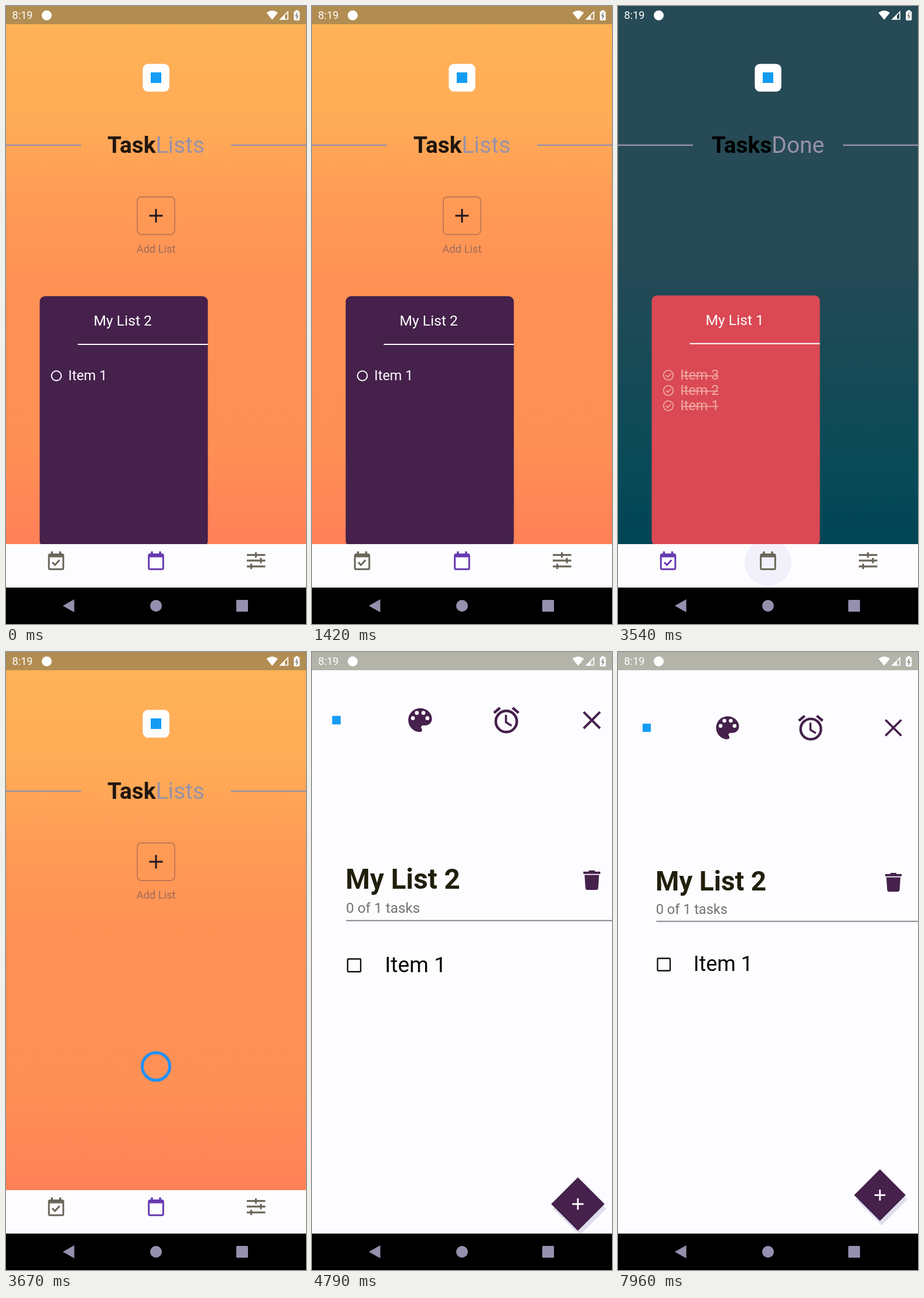
An HTML page with a canvas for the animation above (8 s loop, 512 by 1052 pixels).

```html
<!DOCTYPE html>
<html lang="en">
<head>
<meta charset="utf-8">
<title>Task lists</title>
<style>
html, body { margin: 0; width: 100%; height: 100%; overflow: hidden; background: #000; }
canvas { display: block; width: 100vw; height: 100vh; }
</style>
</head>
<body>
<canvas id="stage"></canvas>
<script>
const W = 512, H = 1052, LOOP = 8000;
const NAV_TOP = 916, PAGE_BOTTOM = 990;
const canvas = document.getElementById('stage');
const ctx = canvas.getContext('2d');
const ratio = window.devicePixelRatio || 1;
canvas.width = W * ratio;
canvas.height = H * ratio;

const PURPLE = '#45214c', RED = '#da4954', PAPER = '#fdfcff', MUTED = '#9792a9';
const ACTIVE = '#673ab0', IDLE = '#6a665a', KEYS = '#9590ae', BLUE = '#149cf5';

// Times of the two tab taps and of the tap that opens the list
const TAP_DONE = 1750, TAP_LISTS = 3420, OPEN = 4160;
const PAGE_DELAY = 150, TAB_DELAY = 200, LOAD_DELAY = 300;

const clamp = v => Math.max(0, Math.min(1, v));

function text(str, x, y, size, color, weight = 400, align = 'left') {
  ctx.font = `${weight} ${size}px Roboto, sans-serif`;
  ctx.textAlign = align;
  ctx.fillStyle = color;
  ctx.fillText(str, x, y);
}

function rect(x, y, w, h, color) {
  ctx.fillStyle = color;
  ctx.fillRect(x, y, w, h);
}

function round(x, y, w, h, r) {
  ctx.beginPath();
  ctx.roundRect(x, y, w, h, r);
}

function disc(x, y, r, color) {
  ctx.beginPath();
  ctx.arc(x, y, r, 0, Math.PI * 2);
  ctx.fillStyle = color;
  ctx.fill();
}

function ring(x, y, r, width, color) {
  ctx.beginPath();
  ctx.arc(x, y, r, 0, Math.PI * 2);
  ctx.lineWidth = width;
  ctx.strokeStyle = color;
  ctx.stroke();
}

function trace(points, close) {
  ctx.beginPath();
  points.forEach(([x, y]) => ctx.lineTo(x, y));
  if (close) ctx.closePath();
}

function line(points, width, color, close = false) {
  trace(points, close);
  ctx.lineWidth = width;
  ctx.strokeStyle = color;
  ctx.stroke();
}

function poly(points, color) {
  trace(points, true);
  ctx.fillStyle = color;
  ctx.fill();
}

function plus(x, y, r, width, color) {
  line([[x - r, y], [x + r, y]], width, color);
  line([[x, y - r], [x, y + r]], width, color);
}

function at(x, y, scale, draw) {
  ctx.save();
  ctx.translate(x, y);
  ctx.scale(scale, scale);
  draw();
  ctx.restore();
}

function background(stops) {
  const g = ctx.createLinearGradient(0, 0, 0, 1000);
  stops.forEach(([pos, color]) => g.addColorStop(pos, color));
  rect(0, 0, W, H, g);
}

function heading(bold, light, ink) {
  const size = 38.9;
  ctx.font = `700 ${size}px Roboto, sans-serif`;
  const a = ctx.measureText(bold).width;
  ctx.font = `400 ${size}px Roboto, sans-serif`;
  const x = 256 - (a + ctx.measureText(light).width) / 2;
  text(bold, x, 250, size, ink, 700);
  text(light, x + a, 250, size, MUTED);
  rect(0, 235.7, 128, 2.4, MUTED);
  rect(384, 235.7, 128, 2.4, MUTED);
}

function badge() {
  round(233.4, 98.4, 45.4, 47.4, 9);
  ctx.fillStyle = '#fefefe';
  ctx.fill();
  rect(247, 113, 18, 18, BLUE);
}

function card(top, color, title) {
  round(57.5, top, 287, 426, 9);
  ctx.fillStyle = color;
  ctx.fill();
  text(title, 149.5, top + 50, 24.7, '#fff');
  rect(122.5, top + 81, 222, 2, '#fff');
}

function doneItem(label, y) {
  const tint = '#efa9a5';
  ring(86, y, 8.3, 1.8, tint);
  line([[82, y], [85, y + 3], [90.5, y - 3]], 1.8, tint);
  text(label, 106.3, y + 7.8, 23.5, tint);
  rect(108, y + 0.3, 63, 1.7, tint);
}

const loader = () => ring(256, 705.5, 23.5, 5, '#2090fb');

function listsPage(loaded) {
  background([[0, '#ffb457'], [0.2, '#ffab57'], [0.33, '#ff9b56'], [0.48, '#ff9155'], [0.74, '#ff9055'], [0.92, '#ff8057']]);
  rect(0, 0, W, 31, '#b28d52');
  badge();
  heading('Task', 'Lists', '#21160f');
  round(224, 325, 64, 64, 7);
  ctx.lineWidth = 1.4;
  ctx.strokeStyle = '#b06d55';
  ctx.stroke();
  plus(256, 357, 11.5, 3, '#21151a');
  text('Add List', 256, 420, 18.3, '#a06a58', 400, 'center');
  if (!loaded) return loader();
  card(494, PURPLE, 'My List 2');
  ring(86, 629.5, 8.3, 2, '#fff');
  text('Item 1', 106.3, 637, 23.5, '#fff');
}

function donePage(loaded) {
  background([[0, '#264a56'], [0.43, '#264a56'], [0.8, '#074a57'], [0.92, '#004457']]);
  badge();
  heading('Tasks', 'Done', '#000');
  if (!loaded) return loader();
  card(492.7, RED, 'My List 1');
  [3, 2, 1].forEach((n, i) => doneItem('Item ' + n, 628.5 + i * 26));
}

function calendar(x, color, checked) {
  round(x - 12.3, 933.5, 24.6, 25.2, 2);
  ctx.lineWidth = 3;
  ctx.strokeStyle = color;
  ctx.stroke();
  rect(x - 12.5, 933, 25, 5.5, color);
  rect(x - 8.8, 928.5, 3.6, 6, color);
  rect(x + 5.2, 928.5, 3.6, 6, color);
  if (checked) line([[x - 6.5, 947], [x - 2, 951.5], [x + 6, 943]], 3, color);
}

function sliders() {
  [[934.5, 426.5], [944, 435], [954, 418.5]].forEach(([y, knob]) => {
    rect(411, y - 1.6, 31.5, 3.2, IDLE);
    rect(knob - 1.6, y - 4.5, 3.2, 9, IDLE);
  });
}

function ripple(x, age) {
  if (age < 0 || age > 200) return;
  ctx.globalAlpha = 1 - clamp((age - 120) / 80);
  disc(x, 947, 40 * Math.sqrt(clamp(age / 100)), '#f2f0fb');
  ctx.globalAlpha = 1;
}

function tabs(t, doneTab) {
  ctx.save();
  ctx.beginPath();
  ctx.rect(0, NAV_TOP, W, PAGE_BOTTOM - NAV_TOP);
  ctx.clip();
  rect(0, NAV_TOP, W, 74, '#fdfdff');
  ripple(85.5, t - TAP_DONE);
  ripple(256, t - TAP_LISTS);
  calendar(85.5, doneTab ? ACTIVE : IDLE, true);
  calendar(256, doneTab ? IDLE : ACTIVE, false);
  sliders();
  ctx.restore();
}

function palette() {
  ctx.fillStyle = PURPLE;
  ctx.fill(new Path2D('M0-9c-4.97 0-9 4.03-9 9s4.03 9 9 9c.83 0 1.5-.67 1.5-1.5 0-.39-.15-.74-.39-1.01-.23-.26-.38-.61-.38-.99 0-.83.67-1.5 1.5-1.5H4c2.76 0 5-2.24 5-5 0-4.42-4.03-8-9-8z'));
  [[-5.5, -1.5], [-2.5, -5.5], [2.5, -5.5], [5.5, -1.5]].forEach(([x, y]) => disc(x, y, 1.5, PAPER));
}

function alarm() {
  ring(0, 1, 8, 2, PURPLE);
  line([[-0.25, -4], [-0.25, 1.6], [4, 4.2]], 1.6, PURPLE);
  [-1, 1].forEach(s => line([[s * 9.36, -5.52], [s * 4.76, -9.38]], 2, PURPLE));
}

function trash() {
  rect(-14, -14, 28, 3.8, PURPLE);
  rect(-5, -16, 10, 3, PURPLE);
  poly([[-12, -8.5], [12, -8.5], [10.5, 14], [8.5, 16], [-8.5, 16], [-10.5, 14]], PURPLE);
}

function diamond(x, y, r, color) {
  poly([[x, y - r], [x + r, y], [x, y + r], [x - r, y]], color);
}

// Drawn at full size; the caller scales it about the page centre
function listSheet() {
  rect(0, 0, W, PAGE_BOTTOM, PAPER);
  rect(42, 122, 14, 14, BLUE);
  at(187, 129, 2.17, palette);
  at(329, 129, 2.17, alarm);
  line([[456.5, 115.5], [483.5, 142.5]], 3.8, PURPLE);
  line([[483.5, 115.5], [456.5, 142.5]], 3.8, PURPLE);
  text('My List 2', 64, 406, 46, '#211f0c', 700);
  text('0 of 1 tasks', 64.7, 446, 23.5, '#75726f');
  rect(65.3, 457.5, W, 2, '#8c8890');
  at(470, 392, 1, trash);
  round(67.5, 521.5, 21.5, 21, 1.5);
  ctx.lineWidth = 2.3;
  ctx.strokeStyle = '#111';
  ctx.stroke();
  text('Item 1', 128.7, 543, 36, '#080808');
  diamond(450, 932, 44, '#e0deeb');
  diamond(447, 924.5, 44, PURPLE);
  plus(447, 924.5, 9.3, 2.8, '#fff');
}

// Damped spring from 0 to 1, a little past 1 near 600 ms
function spring(ms) {
  const s = ms / 1982, damp = 11, freq = 10.45;
  return 1 - Math.exp(-damp * s) * (Math.cos(freq * s) + damp / freq * Math.sin(freq * s));
}

function sheet(t) {
  if (t <= OPEN) return;
  const scale = t > OPEN + 1100 ? 1 : spring(t - OPEN);
  ctx.save();
  ctx.beginPath();
  ctx.rect(0, 0, W, PAGE_BOTTOM);
  ctx.clip();
  ctx.translate(256, 495);
  ctx.scale(scale, scale);
  ctx.translate(-256, -495);
  listSheet();
  ctx.restore();
  const top = Math.max(0, 495 * (1 - scale));
  if (top < 31) {
    const edge = Math.max(0, 256 * (1 - scale));
    rect(edge, top, W - edge * 2, 31 - top, '#b3b3aa');
  }
}

function statusBar() {
  text('8:19', 10.5, 22.3, 18.2, '#fff');
  disc(69.5, 16, 8.5, '#fff');
  ctx.beginPath();
  ctx.moveTo(454.3, 23.5);
  ctx.lineTo(444.5, 11.5);
  ctx.quadraticCurveTo(454.3, 3.8, 464, 11.5);
  ctx.fillStyle = '#fff';
  ctx.fill();
  line([[468.5, 22.5], [481, 22.5], [481, 10]], 1.7, '#fff', true);
  poly([[467, 23.3], [476, 14.5], [476, 23.3]], '#fff');
  round(491.3, 9, 10, 15.5, 1.5);
  ctx.fillStyle = '#fff';
  ctx.fill();
  rect(494, 7, 4.6, 3, '#fff');
  line([[497.3, 11.5], [494.6, 16.8], [498, 16.8], [495.3, 22]], 1.3, '#6b6a60');
}

function systemKeys() {
  rect(0, PAGE_BOTTOM, W, H - PAGE_BOTTOM, '#000');
  poly([[97, 1021], [116.5, 1010], [116.5, 1032]], KEYS);
  disc(256, 1021, 10, KEYS);
  round(393, 1011, 20, 20, 1.5);
  ctx.fillStyle = KEYS;
  ctx.fill();
}

function draw(t) {
  const between = delay => t >= TAP_DONE + delay && t < TAP_LISTS + delay;
  ctx.setTransform(ratio, 0, 0, ratio, 0, 0);
  if (between(PAGE_DELAY)) donePage(t >= TAP_DONE + LOAD_DELAY);
  else listsPage(t < TAP_DONE + PAGE_DELAY || t >= TAP_LISTS + LOAD_DELAY);
  tabs(t, between(TAB_DELAY));
  sheet(t);
  statusBar();
  systemKeys();
}

const start = performance.now();
function tick() {
  draw((performance.now() - start) % LOOP);
  requestAnimationFrame(tick);
}
tick();
</script>
</body>
</html>
```
